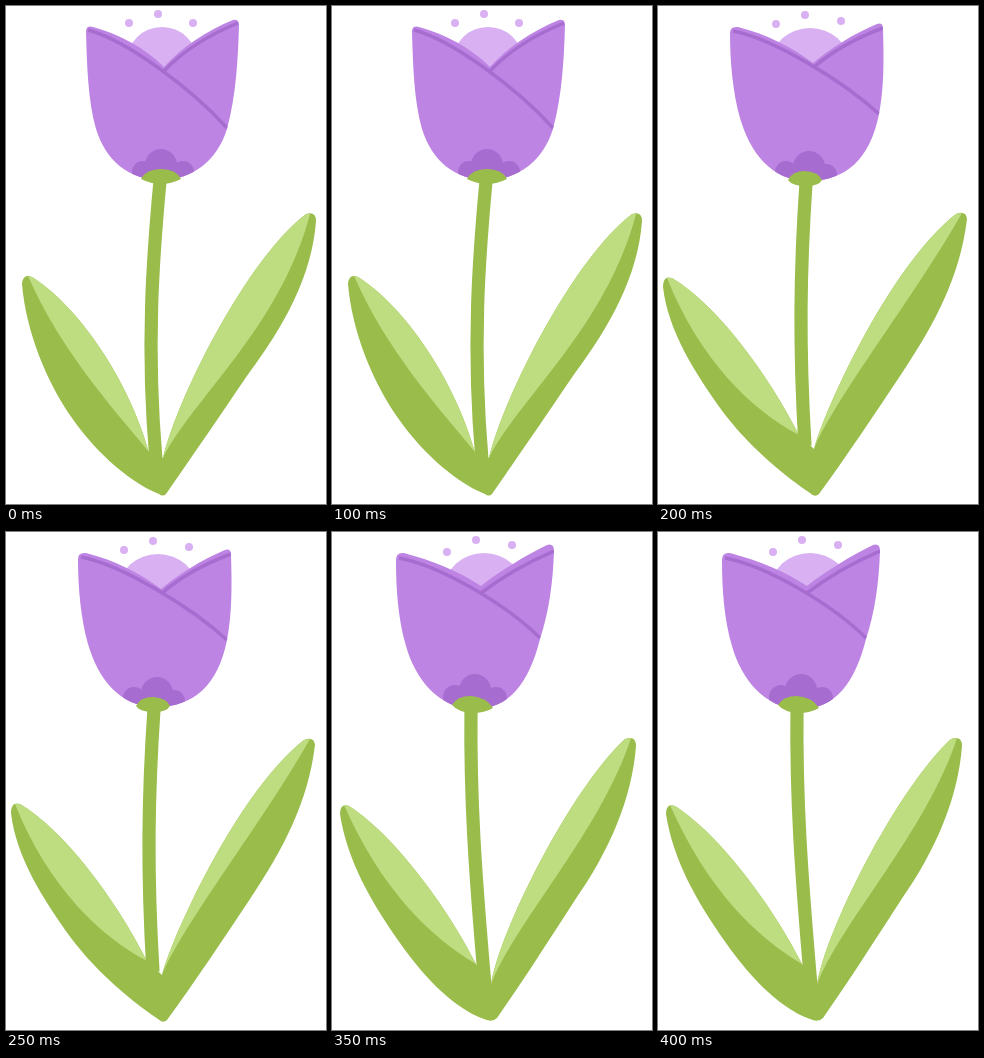
An HTML page for the animation above (0.45 s loop, 320x498 px).

```html
<!DOCTYPE html>
<html lang="en">
<head>
<meta charset="utf-8">
<title>Swaying tulip</title>
<style>
  html, body { margin: 0; width: 100%; height: 100%; overflow: hidden; background: #fff; }
  svg { display: block; width: 100%; height: 100%; }
</style>
</head>
<body>
<svg id="stage" viewBox="0 0 320 498"></svg>
<script>
const LOOP = 450;
const COLOR = { petal: '#be84e4', shade: '#a76ccf', pale: '#d9b1f2', leaf: '#99bc4b', light: '#bedc80' };

// Each pose holds until the next one starts: a hard three-step sway.
const poses = [
  {
    start: 0,
    dots: [[123, 17], [152, 8], [187, 17]],
    back: [156, 55, 35, 34],
    body: 'M80 26Q80 19 87 21C113 28 139 42 158 61C176 41 200 25 227 14Q233 13 233 19C232 54 230 90 221 123C211 155 186 174 155 174C123 174 100 155 90 123C82 95 81 60 80 26Z',
    seam: 'M82 24C120 34 185 82 221 122',
    rim: 'M232 17C205 28 178 44 158 65',
    bumps: [[137, 166, 11], [155, 159, 16], [177, 166, 11]],
    sepal: 'M135 173Q140 163 155 163Q170 163 175 173Q165 178 155 178Q145 178 135 173Z',
    stem: 'M154 175C147 250 140 340 150 454',
    leaves: 'M16 278Q17 267 26 271C72 300 122 372 143 446L157 452C172 390 241 253 300 208Q310 205 310 215C306 270 278 320 243 367C217 405 190 445 160 488Q157 491 153 488C120 475 85 440 66 412C40 375 20 325 16 278Z',
    lights: 'M22 270L26 271C72 300 122 372 143 446C105 400 55 345 22 270ZM157 452C172 390 241 253 300 208L304 208C275 320 185 395 157 452Z'
  },
  {
    start: 200,
    dots: [[118, 18], [147, 9], [183, 15]],
    back: [152, 57, 39, 35],
    body: 'M72 27Q72 20 80 21C108 28 134 41 155 57C173 42 195 28 219 18Q225 16 225 23C226 55 226 82 221 108C212 153 188 175 150 175C113 175 92 146 82 112C75 87 72 57 72 27Z',
    seam: 'M75 25C116 33 185 75 221 108',
    rim: 'M225 22C198 32 172 47 155 62',
    bumps: [[128, 166, 11], [151, 161, 16], [168, 169, 11]],
    sepal: 'M130 174Q134 165 147 165Q161 166 164 174Q161 180 148 180Q134 180 130 174Z',
    stem: 'M148 177C142 265 141 340 147 440',
    leaves: 'M5 281Q5 269 14 272C58 298 109 366 141 429L156 443C170 394 235 257 298 208Q308 204 309 213C302 270 278 316 244 367C216 409 188 451 161 488Q157 492 152 487C119 465 86 434 65 406C37 367 10 325 5 281Z',
    lights: 'M9 272L14 272C58 298 109 366 141 429C95 405 42 355 9 272ZM156 443C170 394 235 257 298 208L304 207C257 290 177 392 156 443Z'
  },
  {
    start: 300,
    dots: [[115, 20], [144, 8], [180, 13]],
    back: [152, 56, 39, 35],
    body: 'M64 28Q64 20 72 21C102 29 128 40 149 54C169 38 193 24 215 13Q222 11 222 19C221 50 217 80 208 107C197 151 177 177 143 177C106 177 83 146 74 114C66 87 64 57 64 28Z',
    seam: 'M67 26C110 34 176 74 208 106',
    rim: 'M222 19C196 30 170 45 149 61',
    bumps: [[123, 165, 12], [143, 158, 16], [164, 166, 11]],
    sepal: 'M120 173Q125 164 139 164Q154 165 161 176Q153 181 140 181Q126 180 120 173Z',
    stem: 'M139 178C138 265 143 340 153 454',
    leaves: 'M8 282Q8 271 17 274C61 302 115 374 144 432L159 453C167 400 238 258 293 207Q304 203 304 214C300 266 278 318 243 368C217 408 193 446 165 486Q160 491 152 487C118 475 87 438 68 411C39 370 15 328 8 282Z',
    lights: 'M12 273L17 274C61 302 115 374 144 432C98 405 49 357 12 273ZM159 453C167 400 238 258 293 207L299 206C269 299 181 393 159 453Z'
  }
];

const shape = (d, fill) => `<path d="${d}" fill="${fill}"/>`;
const line = (d, color, width) =>
  `<path d="${d}" fill="none" stroke="${color}" stroke-width="${width}"/>`;
const circle = ([x, y, r = 4], fill) => `<circle cx="${x}" cy="${y}" r="${r}" fill="${fill}"/>`;

function drawPose(p, i) {
  const [x, y, rx, ry] = p.back;
  return `<g visibility="hidden">
    <clipPath id="petals${i}"><path d="${p.body}"/></clipPath>
    ${shape(p.leaves, COLOR.leaf)}
    ${shape(p.lights, COLOR.light)}
    ${line(p.stem, COLOR.leaf, 13.2)}
    ${p.dots.map(dot => circle(dot, COLOR.pale)).join('')}
    <ellipse cx="${x}" cy="${y}" rx="${rx}" ry="${ry}" fill="${COLOR.pale}"/>
    ${shape(p.body, COLOR.petal)}
    <g clip-path="url(#petals${i})">
      ${line(p.seam, COLOR.shade, 3.5)}
      ${line(p.rim, COLOR.shade, 3.5)}
      ${p.bumps.map(bump => circle(bump, COLOR.shade)).join('')}
    </g>
    ${shape(p.sepal, COLOR.leaf)}
  </g>`;
}

const stage = document.getElementById('stage');
stage.innerHTML = poses.map(drawPose).join('');
const groups = [...stage.children];

function render(now) {
  const time = now % LOOP;
  const current = poses.findLastIndex(p => time >= p.start);
  groups.forEach((g, i) => g.setAttribute('visibility', i === current ? 'visible' : 'hidden'));
}

const begin = performance.now();
function tick() {
  render(performance.now() - begin);
  requestAnimationFrame(tick);
}
tick();
</script>
</body>
</html>
```
